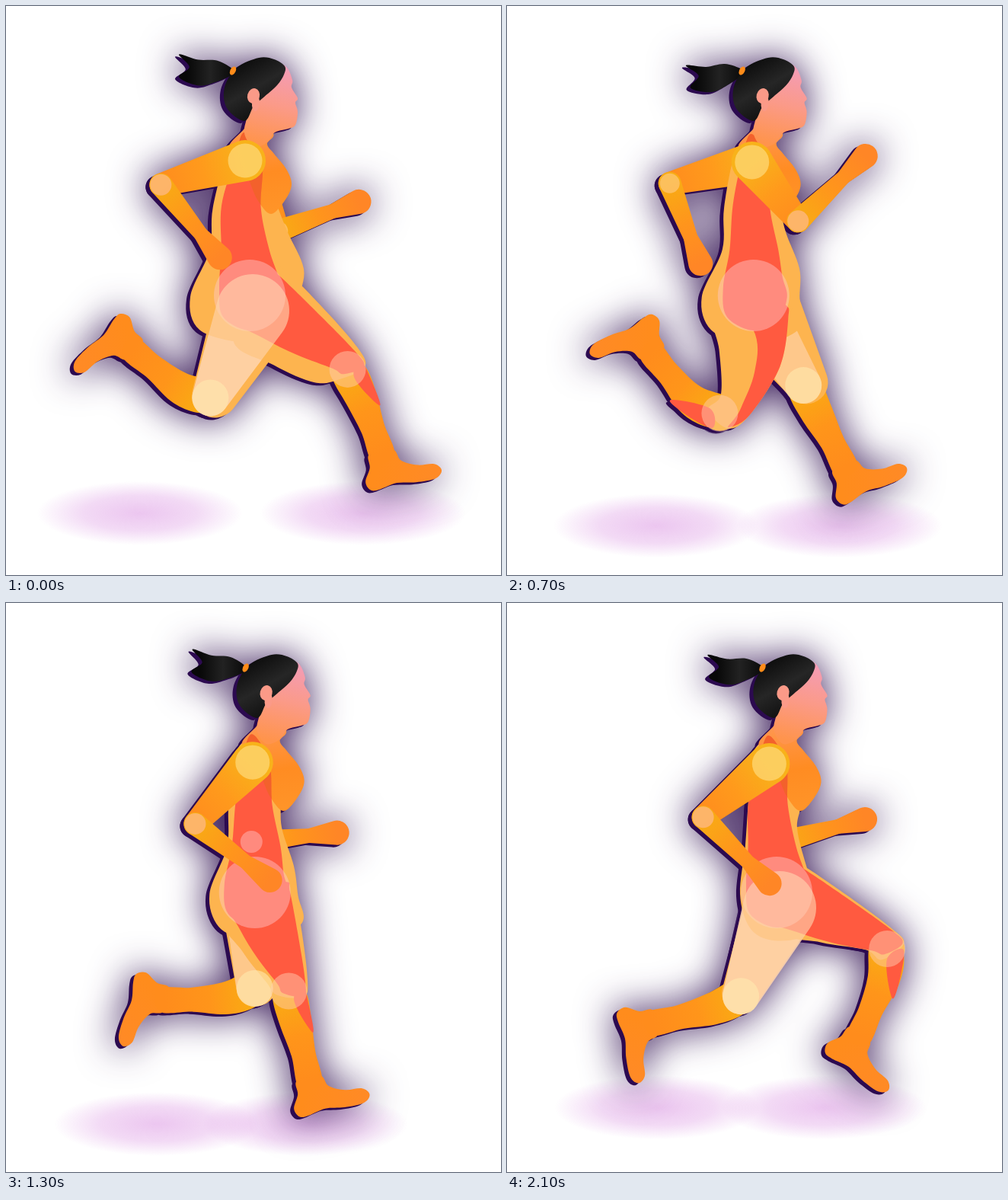
An HTML page with a canvas that plays this animation: 650 by 747 pixels, repeating every 2200 ms.

```html
<!DOCTYPE html>
<html lang="en">
<head>
<meta charset="utf-8">
<title>Runner</title>
<style>
  html, body { margin: 0; width: 100%; height: 100%; overflow: hidden; background: #fff; }
  canvas { position: absolute; left: 0; top: 0; }
  #runner { filter: drop-shadow(-5px 3px 0 #2c0a50) drop-shadow(0 0 25px rgba(42, 10, 76, .92)); }
</style>
</head>
<body>
<canvas id="ground" width="650" height="747"></canvas>
<canvas id="runner" width="650" height="747"></canvas>
<script>
const g = document.getElementById('ground').getContext('2d');
const c = document.getElementById('runner').getContext('2d');
const STEP = 100, STEPS = 22, CYCLE = 11, HALF = CYCLE / 2, TURN = 2 * Math.PI;
const FAT = '#fdb44f', RED = '#ff5a40', PEACH = 'rgba(255,214,176,.62)';

// Key poses: phase, then degrees forward from straight down
const LEG = [ // thigh, shin, thigh length
  [0, 53, 22, 161], [1.5, 29, 27, 135], [2, 19, 13, 137], [4.5, -19, -73, 144],
  [5.5, -21, -122, 144], [7, -16, -132, 161], [7.5, 0, -83, 126], [10, 63, -18, 163]];
const ARM = [ // upper arm, forearm
  [0, -74, 39], [1.5, -76, 21], [2, -43, 53], [4.5, 7, 105],
  [5.5, 23, 110], [7, 38, 134], [7.5, -3, 96], [10, -51, 45]];

// Outlines through a few points, from the heel, the ear or the hair tie
const FOOT = [[7, -44], [4, -26], [-5, -9], [0, 3], [12, 4], [35, 0], [60, 4], [86, 4], [96, -5],
  [88, -15], [66, -18], [46, -28], [38, -44]];
const HEAD = [[0, -20], [20, -45], [42, -40], [51, -22], [50, -12], [58, 2], [55, 8], [58, 20], [55, 37],
  [46, 42], [28, 47], [18, 60], [0, 66], [-12, 48], [-8, 24]];
const HAIR = [[41, -40], [27, -49], [7, -51], [-22, -38], [-38, -12], [-35, 15], [-12, 32], [0, 13],
  [12, 2], [31, -15], [40, -29]];
const TAIL = [[0, -2], [-20, -14], [-45, -16], [-70, -24], [-57, -7], [-71, 6], [-45, 18], [-20, 13], [-1, 5]];
const CHEST = [[0, 22], [-12, 42], [-32, 65], [-20, 85], [-8, 105], [5, 135], [23, 154], [42, 135],
  [50, 115], [43, 95], [27, 75], [18, 62], [26, 48]];

const lerp = (a, b, t) => a + (b - a) * t;
const mix = (a, b, t) => a.map((v, i) => lerp(v, b[i], t));
const clamp = v => Math.max(0, Math.min(1, v));
const add = (a, x, y) => [a[0] + x, a[1] + y];
const shift = (pts, o) => pts.map(p => add(p, ...o));
const rad = deg => deg * Math.PI / 180;
const reach = (p, deg, len) => add(p, Math.sin(rad(deg)) * len, Math.cos(rad(deg)) * len);
const turn = ([x, y], deg) => {
  const s = Math.sin(rad(deg)), k = Math.cos(rad(deg));
  return [x * k - y * s, x * s + y * k];
};

function pose(keys, phase) {
  const at = phase % CYCLE;
  const i = keys.findLastIndex(k => k[0] <= at);
  const a = keys[i], b = keys[i + 1] || keys[0];
  return mix(a, b, (at - a[0]) / ((b[0] || CYCLE) - a[0])).slice(1);
}

function blob(pts, fill) {
  const n = pts.length, at = i => pts[(i + n) % n];
  c.beginPath();
  c.moveTo(...pts[0]);
  for (let i = 0; i < n; i++) {
    const [p, a, b, q] = [at(i - 1), at(i), at(i + 1), at(i + 2)];
    c.bezierCurveTo(a[0] + (b[0] - p[0]) / 6, a[1] + (b[1] - p[1]) / 6,
      b[0] - (q[0] - a[0]) / 6, b[1] - (q[1] - a[1]) / 6, b[0], b[1]);
  }
  c.closePath();
  c.fillStyle = fill;
  c.fill();
}

function oval(p, rx, ry, tilt, fill) {
  c.beginPath();
  c.ellipse(p[0], p[1], rx, ry, tilt, 0, TURN);
  c.fillStyle = fill;
  c.fill();
}

const dot = (p, r, fill) => oval(p, r, r, 0, fill);

function taper(a, b, ra, rb, fill) {
  const dx = b[0] - a[0], dy = b[1] - a[1];
  const dir = Math.atan2(dy, dx), open = Math.acos((ra - rb) / Math.hypot(dx, dy));
  c.beginPath();
  c.arc(a[0], a[1], ra, dir + open, dir - open + TURN);
  c.arc(b[0], b[1], rb, dir - open, dir + open);
  c.closePath();
  c.fillStyle = fill;
  c.fill();
}

function shade(a, b, ...colors) {
  const s = c.createLinearGradient(...a, ...b);
  colors.forEach((color, i) => s.addColorStop(i / (colors.length - 1), color));
  return s;
}

// Place points given as share along a bone and width to its front
function onBone(a, b, pts) {
  const dx = b[0] - a[0], dy = b[1] - a[1], len = Math.hypot(dx, dy);
  return pts.map(([u, v]) => [a[0] + dx * u + dy / len * v, a[1] + dy * u - dx / len * v]);
}

function legAt(hip, phase) {
  const [thigh, shin, len] = pose(LEG, phase);
  const knee = reach(hip, thigh, len), ankle = reach(knee, shin, 120);
  const angle = 11 - shin - 12 * Math.sin(phase / CYCLE * TURN);
  return {
    knee, ankle, angle,
    heel: add(ankle, ...turn([-23, 41], angle)),
    bow: .11 * (thigh - shin),
    back: clamp((18 - thigh) / 34)
  };
}

function lowerLeg({ knee, heel, angle, ankle, bow }) {
  const toe = add(heel, ...turn([92, 0], angle));
  blob(FOOT.map(p => add(heel, ...turn(p, angle))), shade(ankle, toe, '#ff8c1c', '#ff8a26'));
  const skin = shade(knee, ankle, '#f9ae12', '#ff951a', '#ff8c1c');
  dot(knee, 23, skin);
  blob(onBone(knee, ankle, [[-.08, 14], [.08, 22 + bow / 2], [.35, 20 + bow], [.7, 16 + bow / 2], [1.06, 15],
    [1.06, -15], [.7, -16 + bow / 2], [.35, -22 + bow], [.05, -23], [-.08, -14]]), skin);
}

function armAt(shoulder, phase, foreLen) {
  const [upper, fore] = pose(ARM, phase);
  const elbow = reach(shoulder, upper, 104 - .15 * upper);
  return { elbow, hand: reach(elbow, fore, foreLen) };
}

function arm(shoulder, { elbow, hand }) {
  taper(shoulder, elbow, 27, 15, shade(shoulder, elbow, '#f8b21a', '#ff9a1c', '#ff8c1e'));
  const skin = shade(elbow, hand, '#f8ac14', '#ff951c', '#ff8626');
  taper(elbow, mix(elbow, hand, .72), 15, 9, skin);
  taper(mix(elbow, hand, .66), hand, 9, 16, skin);
}

function head(ear, tilt) {
  const tie = add(ear, -27, -34);
  blob(TAIL.map(p => add(tie, ...turn(p, tilt))), shade(add(tie, -60, 0), tie, '#080808', '#222', '#0a0a0a'));
  blob(shift(HEAD, ear), shade(add(ear, 25, -45), add(ear, 0, 60), '#f39cb8', '#fb9a88', '#ff944c'));
  blob(shift(HAIR, ear), shade(add(ear, -30, -40), add(ear, 10, 30), '#0b0b0b', '#262626', '#0d0d0d'));
  oval(add(ear, 0, -1), 8, 10, .25, '#fb9a88');
  oval(add(ear, 3, 9), 5, 10, .1, '#fb9a88');
  oval(tie, 3.5, 6, .5, '#ff8c1a');
}

function ground(legs, phase) {
  g.clearRect(0, 0, 650, 747);
  const y = 673 + 11 * Math.cos((phase - 2) / HALF * TURN);
  const feet = legs.map(l => add(l.heel, ...turn([45, 0], l.angle))[0]);
  const mid = (feet[0] + feet[1]) / 2;
  for (const x of feet) {
    g.save();
    g.translate(lerp(x, mid, .27), y);
    g.scale(1, .31);
    const s = g.createRadialGradient(0, 0, 0, 0, 0, 135);
    s.addColorStop(0, 'rgba(186,50,200,.28)');
    s.addColorStop(.55, 'rgba(186,50,200,.18)');
    s.addColorStop(1, 'rgba(186,50,200,0)');
    g.fillStyle = s;
    g.fillRect(-135, -135, 270, 270);
    g.restore();
  }
}

function draw(step) {
  const phase = step % CYCLE, fat = 1 - step / (STEPS - 1);
  const half = phase % HALF, spin = phase / CYCLE * TURN, beat = 2 * spin;
  const swing = .5 + .5 * Math.cos((phase + .5) / HALF * TURN), rest = 1 - swing;

  // The body glides forward through each stride and snaps back
  const hip = [320 + 34 * (half < 4.5 ? (half / 4.5) ** 2 : HALF - half), 380];
  const ear = [hip[0] + 11 - 6 * Math.cos(beat), 119];
  const shoulder = add(hip, -6 + 4 * Math.sin(beat), -171 - 6 * Math.cos(beat) - 5 * Math.sin(beat));
  const farShoulder = add(shoulder, 4, 0);
  const near = legAt(hip, phase), far = legAt(hip, phase + HALF);
  const nearArm = armAt(shoulder, phase, 123), farArm = armAt(farShoulder, phase + HALF, 113);

  // Thigh widths slide from the forward to the folded-back shape
  const [f1, f2, f3] = mix([44, 36, 25], [52, 59, 38], near.back);
  const [b1, b2, b3] = mix([-34, -25, -11], [16, 29, 25], near.back);
  const [w1, w2] = mix([-32 - 22 * fat, -14 - 26 * fat], [-8 - 24 * fat, -8 * fat], near.back);
  const pad = (1 - near.back) * (3 + 7 * fat);
  const bone = pts => onBone(hip, near.knee, pts);
  const lightThigh = () => taper(add(hip, 4, 20), far.knee, lerp(36, 48, far.back), 24, PEACH);

  ground([near, far], phase);
  c.clearRect(0, 0, 650, 747);

  arm(farShoulder, farArm);
  dot(farArm.elbow, 13, 'rgba(255,205,140,.6)');

  lowerLeg(far);
  taper(add(hip, 6 + 3 * fat, 16), add(far.knee, 6 * fat, -4), 47 + 9 * fat, 25 + 5 * fat, FAT);
  lightThigh();
  lowerLeg(near);

  blob([
    add(shoulder, 0, -34), add(shoulder, -22, -12),
    ...shift([[-30 - 8 * swing - 11 * fat, -115], [-32 - 10 * swing - 11 * fat, -60], [-48 - 30 * fat, 2],
      [-36 - 30 * fat, 45], [-10, 62], [30, 60], [60 + 8 * fat, 38], [52 + 13 * fat, 5], [39 + 32 * fat, -35],
      [27 + 22 * fat, -85], [32, -130]], hip),
    add(shoulder, 14, -28)
  ], FAT);
  blob(bone([[0, 44], [.1, f1 + pad], [.5, f2 + pad], [.95, f3 + pad * .6], [1.1, 16], [1, -16],
    [.85, w2], [.5, w1], [.1, -44 - 14 * fat]]), FAT);

  blob(shift(CHEST, ear), shade(ear, add(ear, 20, 150), '#fb9a80', '#ff9548', '#ff8c22', '#ff9428'));

  // Front thigh muscle and its point on the shin
  blob(bone([[0, -38], [-.06, 0], [0, 43], [.1, f1], [.5, f2], [.95, f3], [1.09, 16], [1, Math.max(b3 - 4, -8)],
    [.9, b3], [.6, b2], [.3, b1]]), RED);
  blob(onBone(near.knee, near.ankle, [[-.05, 20], [.2, 21 + near.bow * .7], [.5, 18 + near.bow], [.12, 4]]), RED);

  blob([
    add(shoulder, -1, -37), add(shoulder, -14, 0),
    ...shift([[-25 - 13 * swing, -118], [-30 - 8 * swing, -60], [-40, -10], [-35, 28], [0, 46], [32, 32],
      [44, 2], [38, -24], [25 + 9 * rest, -60], [14 + 9 * rest, -115]], hip),
    add(shoulder, 22, 0)
  ], RED);
  c.save();
  c.clip();
  blob(shift(CHEST, ear), 'rgba(232,104,24,.5)');
  c.restore();

  dot(hip, 47, 'rgba(255,200,205,.44)');
  if (swing > .6 && far.back === 1) lightThigh();

  dot(far.knee, 24, 'rgba(255,234,176,.6)');
  dot(near.knee, 24, 'rgba(255,205,175,.48)');
  if (phase > 1.5 && phase < 4) dot(farArm.elbow, 14.5, 'rgba(255,200,205,.44)');

  head(ear, tilt(spin));
  arm(shoulder, nearArm);
  dot(shoulder, 22.5, 'rgba(255,222,130,.66)');
  dot(nearArm.elbow, 14, 'rgba(255,186,146,.68)');
}

const tilt = spin => -6.5 + 7 * Math.cos(spin - rad(50));

let shown = -1;
function tick() {
  const step = Math.floor(performance.now() / STEP) % STEPS;
  if (step !== shown) draw(shown = step);
  requestAnimationFrame(tick);
}
tick();
</script>
</body>
</html>
```
